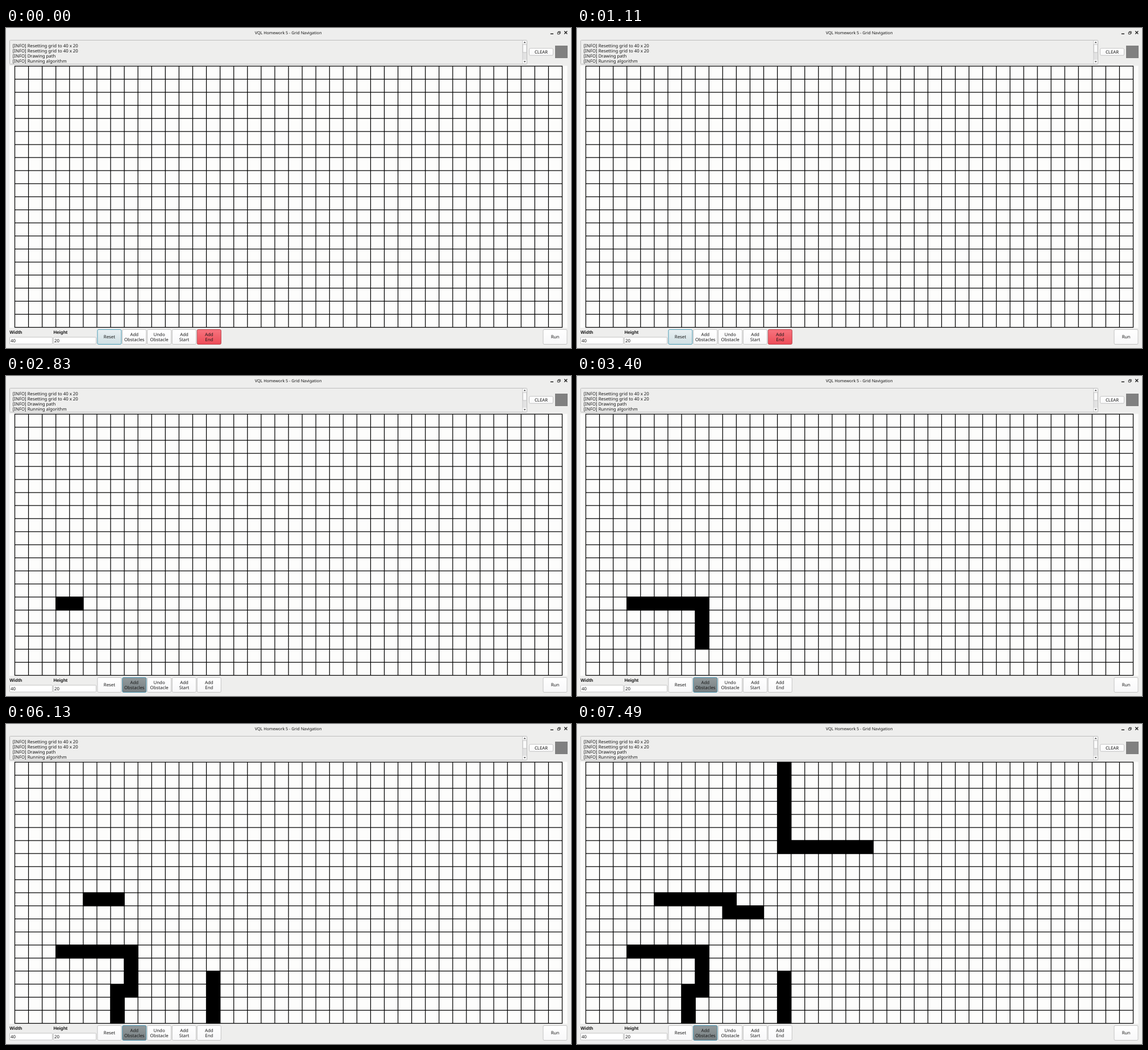
An HTML page for the animation above (8000 ms loop, 994x563 px).

```html
<!DOCTYPE html>
<html lang="en">
<head>
<meta charset="utf-8">
<title>Grid planner</title>
<style>
html, body { margin: 0; width: 100%; height: 100%; overflow: hidden; background: #eeeeed; }
svg { display: block; width: 994px; height: 563px; }
text { font: 7.8px "Noto Sans", "Open Sans", sans-serif; fill: #161616; text-rendering: geometricPrecision; white-space: pre; }
.mid { text-anchor: middle; }
.title { font-size: 7.2px; }
.label { font: bold 8px "Liberation Sans", sans-serif; }
</style>
</head>
<body>
<svg id="stage" viewBox="0 0 994 563"></svg>
<script>
const LOOP = 8000, COLS = 40, ROWS = 20;
const LEFT = 15.5, TOP = 67.2, CW = 24.075, CH = 22.97, LINE = 1.25;
const stage = document.getElementById('stage');

const text = (x, y, s, cls = '') => `<text x="${x}" y="${y}" class="${cls}">${s}</text>`;
const box = (x, y, w, h, fill, stroke = 'none', r = 0) =>
  `<rect x="${x}" y="${y}" width="${w}" height="${h}" rx="${r}" fill="${fill}" stroke="${stroke}"/>`;
const path = (d, stroke, width = 1) =>
  `<path d="${d}" fill="none" stroke="${stroke}" stroke-width="${width}"/>`;
const gradient = (id, a, b) =>
  `<linearGradient id="${id}" x2="0" y2="1"><stop stop-color="${a}"/><stop offset="1" stop-color="${b}"/></linearGradient>`;

function button(x, y, w, h, label, fill = 'plain', stroke = '#c3c3c3') {
  const lines = label.split('|');
  const base = y + h / 2 + 2.8 - (lines.length - 1) * 4.5;
  return box(x, y, w, h, `url(#${fill})`, stroke, 2) +
    lines.map((s, i) => text(x + w / 2, base + i * 9, s, 'mid')).join('');
}
const tool = (i, label, fill, stroke) => button(160.9 + i * 43.85, 530.5, 42, 26, label, fill, stroke);

function gridLines() {
  let d = '';
  for (let c = 0; c <= COLS; c++) d += `M${LEFT + c * CW} ${TOP - .6}V${TOP + ROWS * CH + .6}`;
  for (let r = 0; r <= ROWS; r++) d += `M${LEFT} ${TOP + r * CH}H${LEFT + COLS * CW}`;
  return path(d, '#000', LINE);
}

// Each stroke: start, end, number of visible steps, corner cells (column, row)
const strokes = [
  [2730, 2970, 4, [[3, 14], [6, 14]]],
  [3130, 3260, 2, [[7, 14], [8, 14], [8, 15]]],
  [3400, 3400, 1, [[8, 16], [8, 17]]],
  [3540, 3780, 3, [[7, 17], [7, 19]]],
  [5170, 5270, 4, [[14, 16], [14, 19]]],
  [6090, 6230, 5, [[5, 10], [10, 10], [10, 11], [12, 11]]],
  [7180, 7490, 8, [[14, 0], [14, 6], [20, 6]]]
];

function walk(corners) {
  let [c, r] = corners[0];
  const cells = [[c, r]];
  for (const [tc, tr] of corners.slice(1))
    while (c !== tc || r !== tr) {
      c += Math.sign(tc - c);
      r += Math.sign(tr - r);
      cells.push([c, r]);
    }
  return cells;
}

// Turn the strokes into cells with the time each one appears
const cells = strokes.flatMap(([start, end, steps, corners]) => {
  const list = walk(corners);
  return list.map(([c, r], i) => {
    const step = Math.ceil(i * (steps - 1) / (list.length - 1));
    return { c, r, at: start + (end - start) * step / Math.max(1, steps - 1) };
  });
});

const log = ['Resetting grid to 40 x 20', 'Resetting grid to 40 x 20', 'Drawing path', 'Running algorithm'];

stage.innerHTML = '<defs>' +
  gradient('plain', '#ffffff', '#f8f8f9') +
  gradient('focus', '#e9f0f2', '#cfdfe3') +
  gradient('dark', '#929a9c', '#777f82') +
  gradient('red', '#f7747e', '#ed4c58') + '</defs>' +
  box(0, 0, 994, 563, '#eeeeed') +
  text(496.5, 10.6, 'VQL Homework 5 - Grid Navigation', 'mid title') +
  path('M957.8 10.3H963', '#222', 1.5) +
  path('M970.3 7.6h3.7v3.2h-3.7zM971.7 7.4V6.2h3.5v3.3h-1', '#222', .9) +
  path('M982.3 5.6l5 5m0-5l-5 5', '#222', 1.4) +
  // log panel and scrollbar
  box(6.5, 21.5, 910, 42, '#eeeeed', '#bdbdbd', 1) +
  log.map((s, i) => text(11.8, 33.6 + i * 9.1, '[INFO] ' + s)).join('') +
  box(909, 22, 7, 41, '#e2e2e2') +
  path('M908.8 22V63', '#c4c4c4', .8) +
  box(909.2, 22.3, 6.8, 6.4, '#f8f8f8') +
  box(909.2, 29, 6.8, 14, '#fafafa', '#c4c4c4') +
  box(909.2, 56, 6.8, 6.5, '#f8f8f8') +
  '<path d="M910.6 26.2l2-2.2 2 2.2zM910.6 58.2l2 2.2 2-2.2z" fill="#444"/>' +
  button(920.5, 35.8, 42, 12.4, 'CLEAR') +
  box(966, 31, 22, 22, '#808080') +
  // drawing area
  box(6, 66.5, 981.5, 461, '#fdfdfc') +
  gridLines() +
  cells.map(({ c, r }) => `<rect class="cell" x="${LEFT + c * CW - LINE / 2}" y="${TOP + r * CH - LINE / 2}" ` +
    `width="${CW + LINE}" height="${CH + LINE}"/>`).join('') +
  // bottom bar
  text(6.3, 538, 'Width', 'label') + text(83.4, 538, 'Height', 'label') +
  box(6.5, 544, 75, 12, '#fff', '#c3c3c3', 1) + text(8, 553, '40') +
  box(83.5, 544, 75, 12, '#fff', '#c3c3c3', 1) + text(85, 553, '20') +
  tool(2, 'Undo|Obstacle') + tool(3, 'Add|Start') +
  button(945, 530.5, 42, 26, 'Run') +
  '<g id="before">' + tool(0, 'Reset', 'focus', '#4c9db5') + tool(1, 'Add|Obstacles') +
  tool(4, 'Add|End', 'red', '#b9444d') + '</g>' +
  '<g id="after">' + tool(0, 'Reset') + tool(1, 'Add|Obstacles', 'dark', '#4690ad') +
  tool(4, 'Add|End') + '</g>';

const rects = stage.querySelectorAll('.cell');
const before = document.getElementById('before'), after = document.getElementById('after');
const show = (el, on) => el.setAttribute('visibility', on ? 'visible' : 'hidden');

function draw(now) {
  const t = now % LOOP;
  show(before, t < 1860);
  show(after, t >= 1860);
  cells.forEach((cell, i) => show(rects[i], t >= cell.at));
}
const begin = performance.now();
function tick() {
  draw(performance.now() - begin);
  requestAnimationFrame(tick);
}
tick();
</script>
</body>
</html>
```
